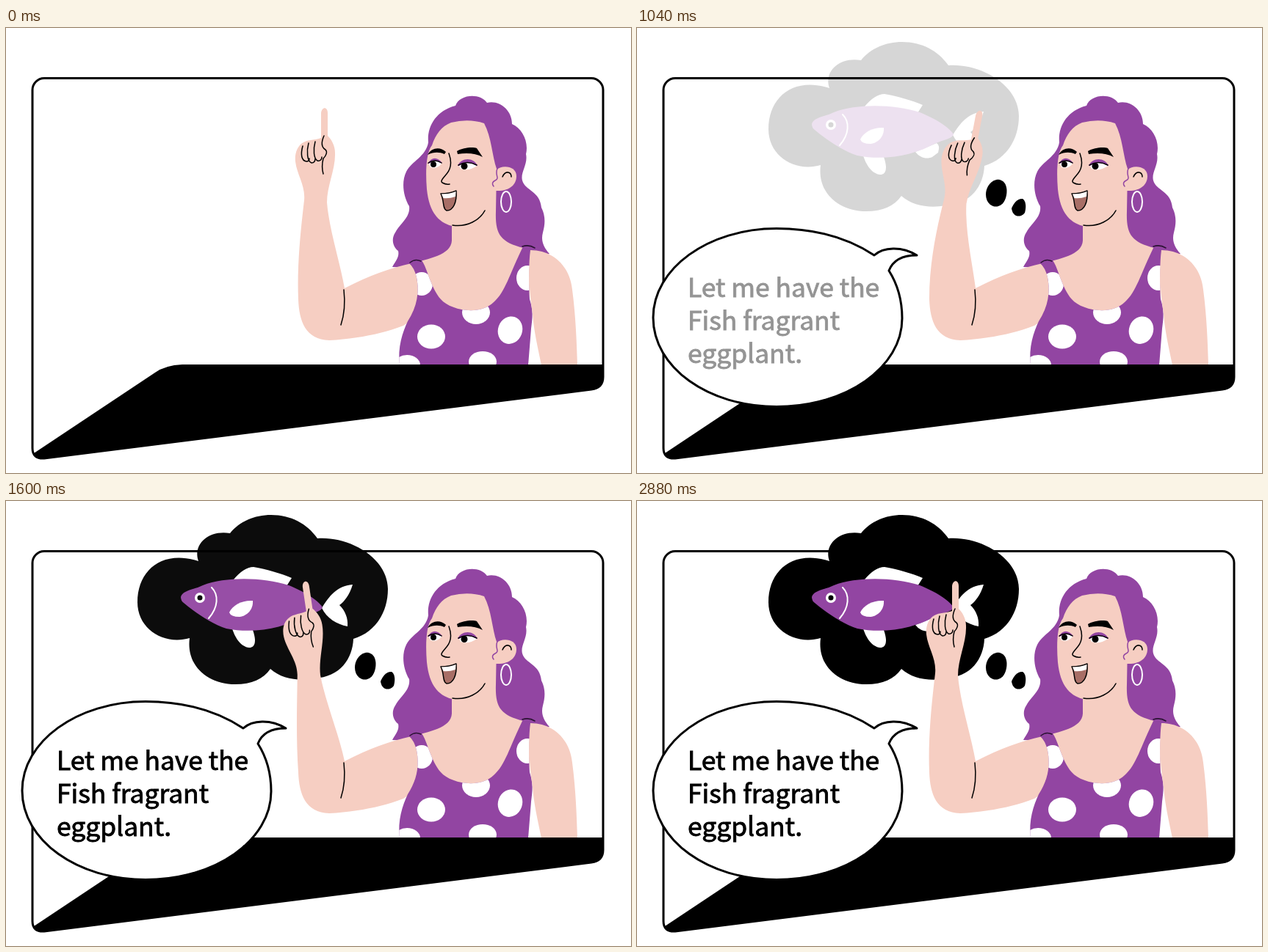
An HTML page that plays this animation: 851x607 px, repeating every 3.52 s.

```html
<!DOCTYPE html>
<html lang="en">
<head>
<meta charset="utf-8">
<title>Ordering dinner</title>
<style>
  html, body { margin: 0; width: 100%; height: 100%; overflow: hidden; background: #fff; }
  svg { display: block; width: 100%; height: 100%; }
  .purple { fill: #9245a2; }
  .skin { fill: #f6cec2; }
  .white { fill: #fff; }
  .line { fill: none; stroke: #000; stroke-width: 1.5; stroke-linecap: round; stroke-linejoin: round; }
  .frame { stroke: #000; stroke-width: 3; stroke-linejoin: round; fill: #fff; }
  text { font: 500 35.4px "Noto Sans CJK SC", "Noto Sans CJK JP", "Noto Sans", sans-serif; stroke: #000; stroke-width: .9; }
</style>
</head>
<body>
<svg viewBox="0 0 851 607">
  <defs>
    <path id="dressShape" d="M549,321 Q556,314 566,317 C574,328 578,354 592,370 C605,385 645,393 664,374 C680,360 685,337 704,298 Q713,295 720,300 C712,315 711,335 713,370 C718,385 717,395 715,410 L711,460 H536 C533,435 540,415 547,400 C560,380 563,360 559,340 Q556,327 549,321Z"/>
    <clipPath id="dressClip"><use href="#dressShape"/></clipPath>
  </defs>

  <path class="frame" d="M36,84.500 A16,16 0 0 1 52,68.500 H797 A16,16 0 0 1 813,84.500 V476 Q813,491 797,493 L52,587 Q36,588 36,573Z"/>

  <g id="thought">
    <path d="M262,82 C254,60 275,39 305,44 C318,28 338,19 361,19 C388,19 410,31 424,51 C465,48 519,75 520,120 C520,155 500,180 473,188 C472,215 455,240 420,242 C400,246 375,243 360,229 C350,243 335,250 312,250 C275,250 245,225 250,187 C215,197 179,175 179,138 C179,95 212,66 262,82Z"/>
    <g class="white">
      <path d="M310,107 C318,97 328,90 337,90 C355,93 375,99 389,105 L382,116 C360,115 335,115 310,107Z"/>
      <path d="M430,146 C440,130 450,116 472,114 C468,128 460,138 454,142 C462,150 466,160 465,171 C450,168 437,160 430,146Z"/>
      <path d="M308,174 C312,187 320,199 331,200 C340,200 341,190 336,176Z"/>
      <path d="M379,169 C386,178 395,179 402,176 L410,170 Q413,160 408,157Z"/>
    </g>
    <path class="purple" d="M238,131 C240,122 256,121 268,115 C300,103 350,104 385,115 C405,123 425,135 431,145 C428,152 420,151 405,158 C380,172 340,182 300,174 C280,168 255,150 242,139 Q238,136 238,131Z"/>
    <path class="white" d="M304,152 C308,142 322,135 336,136 C337,148 328,157 318,158 Q306,158 304,152Z"/>
    <circle class="white" cx="264" cy="132" r="7"/>
    <circle cx="264" cy="132" r="3.5"/>
    <path class="line" style="stroke:#fff;stroke-width:2" d="M280,118 C290,128 289,145 276,160"/>
  </g>
  <path id="bigDot" d="M475,227 C475,215 485,205 494,207 C504,210 505,222 502,232 C498,244 488,246 481,241 Q475,236 475,227Z"/>
  <path id="smallDot" d="M510,246 C513,238 519,232 525,233 C530,236 530,245 528,252 C524,258 512,260 510,246Z"/>

  <g id="woman">
    <path class="purple" d="M612,106 C617,90 646,88 655,102 C672,98 689,112 689,131 C703,137 712,155 708,172 C711,186 700,197 703,208 C707,222 727,222 729,245 C735,257 734,268 731,279 C728,290 732,299 740,308 L650,330 L526,326 C530,318 536,313 534,304 C527,299 524,288 530,279 C537,266 551,258 549,243 C541,230 538,210 545,196 C552,182 572,175 575,156 C573,135 585,113 612,106Z"/>
    <path class="skin" d="M606,129 Q630,123 651,130 C661,148 662,175 668,192 L667,250 C666,280 672,292 705,300 L714,302 L712,400 H560 L551,321 C575,315 606,310 607,290 V270 C588,265 576,250 573,220 C571,195 572,170 580,160 C585,145 593,134 606,129Z"/>
    <path class="skin" d="M667,194 C675,186 695,188 695,202 C695,214 685,223 667,222Z"/>

    <path d="M574,173 C580,162 592,162 599,169 L597,172 C590,169 582,169 574,173Z"/>
    <path d="M614,168 C622,163 636,162 641,164 L649,176 C640,171 628,170 615,172Z"/>
    <path class="purple" d="M574,185 Q583,171 594,184Z M615,188 C620,176 637,176 642,188Z"/>
    <path class="white" d="M576,185 Q585,178 593,185 Q587,193 578,190Z M617,188 Q628,180 641,188 Q630,196 619,192Z"/>
    <circle cx="582" cy="186" r="4"/>
    <circle cx="624" cy="188.500" r="4.500"/>
    <path class="line" d="M575,184 Q584,178 593,184 M616,187 Q628,180 641,187"/>
    <path class="line" d="M603,171 C607,182 606,192 600,199 C595,205 591,209 594,211 Q599,214 604,213 M608,269 C628,272 645,262 652,249 M676,203 Q679,196 684,197 Q688,198 688,203"/>
    <path class="line" style="fill:#a86e66" d="M592,226 Q604,226 613,222 C614,238 609,249 600,249 C594,247 597,235 592,226Z"/>
    <path class="white" d="M593,226.500 Q604,226.500 612.500,223 L612,230 Q603,233 595.500,232Z"/>
    <path class="line" style="stroke:#9245a2" d="M669,192 C665,200 673,205 666,208 Q660,211 664,216"/>
    <ellipse class="line" style="stroke:#fff;stroke-width:2" cx="681" cy="237" rx="7" ry="14"/>

    <g id="arm">
      <path class="skin" d="M552,321 C520,328 490,340 461,355 C455,320 440,275 437,238 C437,215 449,192 448,170 C448,160 443,152 438,147 L438,116 C438,107 430,107 429,116 L429,150 C420,153 412,152 405,156 C396,161 393,172 394,182 C396,200 408,215 406,235 C402,270 396,320 398,370 C399,400 408,425 440,426 C480,424 515,416 541,406 L565,390 L565,330Z"/>
      <path class="line" d="M404,161 C401,172 402,181 409,182 C412,182 413,180 413,178 M412,157 C409,168 410,182 416,184 C420,184 421,181 421,178 M421,155 C418,166 419,178 424,181 C428,182 430,179 430,176 M433,147 C428,158 430,163 435,166 C438,169 436,174 432,178 C430,186 430,192 432,199"/>
    </g>
    <path class="line" d="M460,357 C462,375 461,390 456,405"/>

    <use class="purple" href="#dressShape"/>
    <g class="white" clip-path="url(#dressClip)">
      <ellipse cx="579" cy="421" rx="19" ry="16.500"/>
      <ellipse cx="686.500" cy="412" rx="16.500" ry="19" transform="rotate(20 686 412)"/>
      <ellipse cx="640" cy="388" rx="19" ry="16"/>
      <ellipse cx="566" cy="349" rx="15" ry="16"/>
      <ellipse cx="710" cy="341" rx="15" ry="17"/>
      <ellipse cx="649" cy="455" rx="19" ry="14"/>
      <ellipse cx="546" cy="460" rx="18" ry="14"/>
    </g>
    <path class="skin" d="M714,303 C745,303 768,325 771,357 C776,395 777,430 778,460 H729 C724,435 719,415 717,390 C712,360 711,325 714,303Z"/>
    <path class="line" style="stroke:#2b1233" d="M550,320 Q557,314 565,318 M703,298 Q712,295 720,300"/>
  </g>

  <path d="M38,580 L203,470 Q217,460 240,459 H813 V476 Q813,491 797,493 L52,587 Q40,588 38,580Z"/>

  <path id="bubble" class="frame" d="M323,310 C285,285 240,273.500 190,273.500 C97,273.500 22,328 22,395 C22,463 97,516.500 190,516.500 C285,516.500 361,463 361,396 C361,370 355,350 343,331 C348,318 360,310 381,310 C360,297 335,299 323,310Z"/>
  <text id="speech">
    <tspan x="69" y="367">Let me have the</tspan>
    <tspan x="69" y="412">Fish fragrant</tspan>
    <tspan x="69" y="457">eggplant.</tspan>
  </text>
</svg>
<script>
  const LOOP = 3520, STEP = 80;
  const fades = { smallDot: [160, 440], bigDot: [400, 720], bubble: [560, 900], speech: [880, 1265], thought: [930, 1636] };
  // Sideways reach of the fingertip at each turn of the wag
  const wag = [[160, 0], [480, -28], [1010, 34], [1540, -28], [2070, 34], [2600, -28], [2880, 0]];
  const arm = [...document.querySelectorAll('#arm path')].map(node => ({ node, rest: node.getAttribute('d') }));
  const elbow = { x: 425, y: 350, reach: 240 };

  const clamp = v => Math.min(1, Math.max(0, v));

  function reachAt(t) {
    return wag.slice(1).reduce((x, [end, to], i) => {
      const [start, from] = wag[i];
      return x + (to - from) * (1 - Math.cos(Math.PI * clamp((t - start) / (end - start)))) / 2;
    }, 0);
  }

  // Bends the forearm: the turn grows with the height above the elbow
  function bend(path, angle) {
    return path.replace(/([\d.]+),([\d.]+)/g, (pair, px, py) => {
      const x = px - elbow.x, y = py - elbow.y;
      if (y >= 0 || px > 470) return pair;
      const a = angle * (-y / elbow.reach) ** 0.4, c = Math.cos(a), s = Math.sin(a);
      return `${(elbow.x + x * c - y * s).toFixed(2)},${(elbow.y + x * s + y * c).toFixed(2)}`;
    });
  }

  function draw(now) {
    const t = Math.floor(now % LOOP / STEP) * STEP;
    for (const [id, [start, end]] of Object.entries(fades))
      document.getElementById(id).style.opacity = clamp((t - start) / (end - start));
    const angle = reachAt(t) / elbow.reach;
    for (const { node, rest } of arm) node.setAttribute('d', bend(rest, angle));
  }

  const begin = performance.now();
  function tick() {
    draw(performance.now() - begin);
    requestAnimationFrame(tick);
  }
  tick();
</script>
</body>
</html>
```
